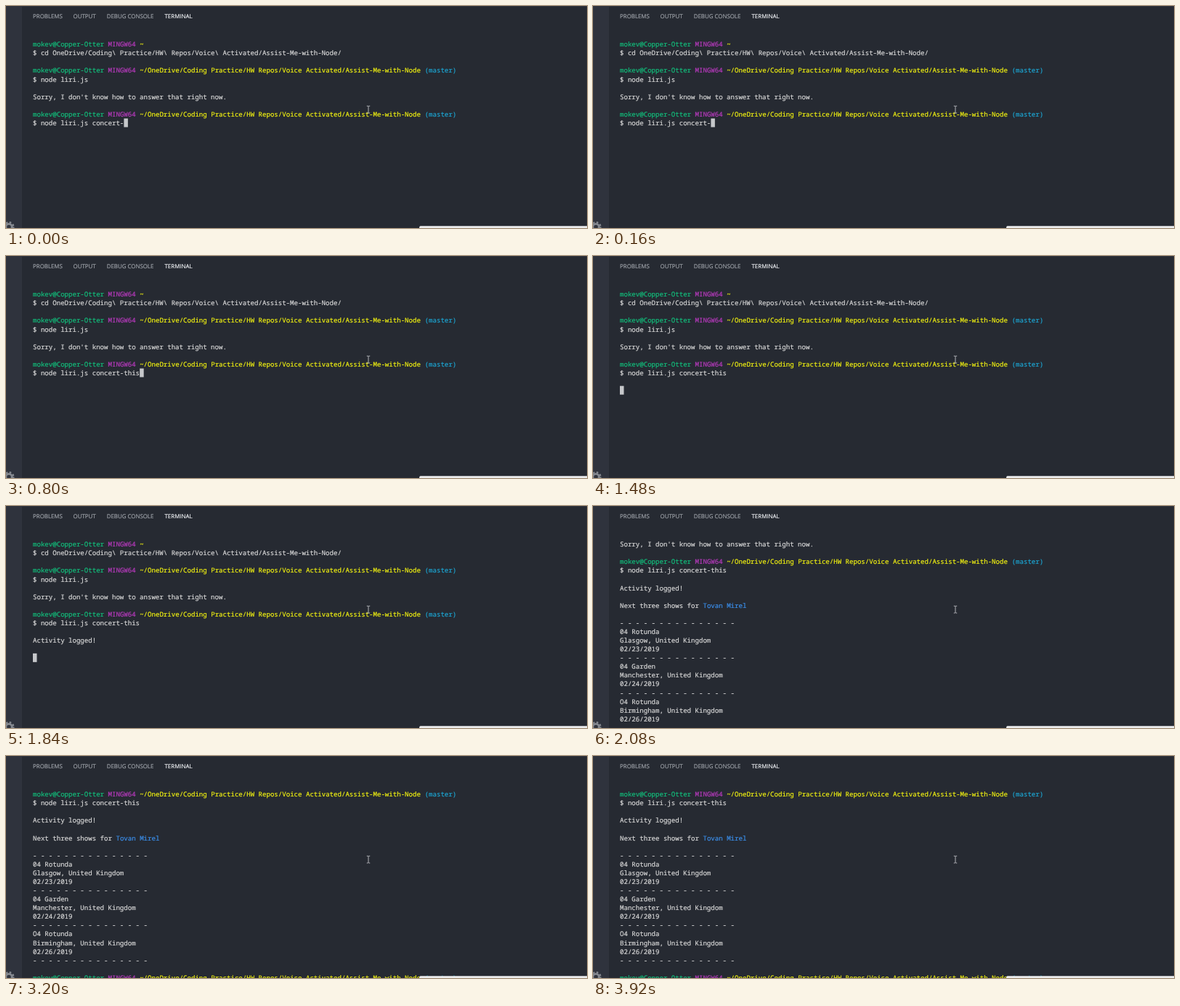
An HTML page for the animation above (4 s loop, 800 by 307 pixels).

```html
<!DOCTYPE html>
<html lang="en">
<head>
<meta charset="utf-8">
<title>Terminal session</title>
<style>
  html, body { margin: 0; width: 100%; height: 100%; overflow: hidden; background: #262a32; }
  svg { display: block; width: 800px; height: 307px; overflow: hidden; }
  text { text-rendering: geometricPrecision; fill: currentColor; stroke: currentColor; stroke-width: .2px; }
  #tabs { font: 7.9px "Open Sans", "Noto Sans", sans-serif; color: #9b9fa6; }
  #tabs .active { color: #eceef1; }
  #screen { font: 9.085px "Noto Sans Mono", "DejaVu Sans Mono", monospace; }
</style>
</head>
<body>
<svg viewBox="0 0 800 307">
  <rect width="800" height="307" fill="#262a32"/>
  <rect width="22" height="307" fill="#2f333d"/>
  <rect x="22" width="778" height="1" fill="#30343d"/>
  <g fill="none" stroke="#858990">
    <circle cx="4" cy="305.5" r="4.2" stroke-width="2.8"/>
    <circle cx="4" cy="305.5" r="6.3" stroke-width="2.4" stroke-dasharray="2.5 2.45"/>
  </g>
  <g id="tabs">
    <text x="37" y="17.3">PROBLEMS</text>
    <text x="92.5" y="17.3">OUTPUT</text>
    <text x="138.7" y="17.3">DEBUG CONSOLE</text>
    <text x="218.5" y="17.3" class="active">TERMINAL</text>
  </g>
  <g id="screen"></g>
  <rect id="cursor" width="5.5" height="12" fill="#c6c8cb"/>
  <path d="M496.8 138.3h1.6l.6.6.6-.6h1.6M499 138.8v8.6M496.8 148h1.6l.6-.6.6.6h1.6"
        fill="none" stroke="#c4c6ca" stroke-width=".9"/>
  <path d="M800 304.3H570.5q-1.5 0-1.5 2.7H800z" fill="#ecedee"/>
</svg>
<script>
const LOOP = 4000, LEFT = 37, BASELINE = 56.2, ROW = 12.08, COLUMN = 5.451;
const COLORS = {
  plain: '#d6d6d6', green: '#12bf7c', magenta: '#b83abe',
  yellow: '#f2f210', cyan: '#1ca5d2', blue: '#3b8eea'
};

const plain = text => [['plain', text]];
const blank = [];
const rule = plain(Array(15).fill('-').join(' '));
const prompt = (path, branch) => [
  ['green', 'mokev@Copper-Otter '], ['magenta', 'MINGW64 '],
  ['yellow', path + ' '], ['cyan', branch]
];
const repo = prompt('~/OneDrive/Coding Practice/HW Repos/Voice Activated/Assist-Me-with-Node', '(master)');
const show = (venue, city, day) =>
  [rule, plain(venue), plain(city + ', United Kingdom'), plain(`02/${day}/2019`)];

const COMMAND_LINE = 9;
const command = '$ node liri.js concert-';
const transcript = [
  prompt('~', ''),
  plain('$ cd OneDrive/Coding\\ Practice/HW\\ Repos/Voice\\ Activated/Assist-Me-with-Node/'),
  blank, repo, plain('$ node liri.js'),
  blank, plain("Sorry, I don't know how to answer that right now."),
  blank, repo, plain(command),
  blank, plain('Activity logged!'),
  blank, [['plain', 'Next three shows for '], ['blue', 'Tovan Mirel']],
  blank,
  ...show('04 Rotunda', 'Glasgow', 23),
  ...show('04 Garden', 'Manchester', 24),
  ...show('O4 Rotunda', 'Birmingham', 26),
  rule, blank, repo, plain('$')
];

// top: first visible line; end: line holding the cursor
const steps = [
  { at: 0, typed: '', top: 0, end: 9 },
  { at: 480, typed: 't', top: 0, end: 9 },
  { at: 600, typed: 'th', top: 0, end: 9 },
  { at: 680, typed: 'thi', top: 0, end: 9 },
  { at: 760, typed: 'this', top: 0, end: 9 },
  { at: 1160, typed: 'this', top: 0, end: 10 },
  { at: 1400, typed: 'this', top: 0, end: 11 },
  { at: 1760, typed: 'this', top: 0, end: 13 },
  { at: 2080, typed: 'this', top: 6, end: 28 },
  { at: 2440, typed: 'this', top: 8, end: 30 }
];

const screen = document.getElementById('screen');
const cursor = document.getElementById('cursor');

function drawLine(segments, row) {
  let column = 0;
  for (const [color, text] of segments) {
    const node = document.createElementNS(screen.namespaceURI, 'text');
    node.setAttribute('x', LEFT + column * COLUMN);
    node.setAttribute('y', BASELINE + row * ROW);
    node.setAttribute('color', COLORS[color]);
    node.textContent = text;
    screen.append(node);
    column += text.length;
  }
}

function draw({ typed, top, end }) {
  screen.replaceChildren();
  const typing = end === COMMAND_LINE;
  const last = typing || end === transcript.length - 1 ? end : end - 1;
  for (let i = top; i <= last; i++) {
    drawLine(i === COMMAND_LINE ? plain(command + typed) : transcript[i], i - top);
  }
  const column = typing ? command.length + typed.length : 0;
  cursor.setAttribute('x', LEFT + column * COLUMN);
  cursor.setAttribute('y', BASELINE - 9.4 + (end - top) * ROW);
}

let current;
function tick() {
  const time = performance.now() % LOOP;
  const step = steps.findLast(s => s.at <= time);
  if (step !== current) draw(current = step);
  requestAnimationFrame(tick);
}
tick();
</script>
</body>
</html>
```
